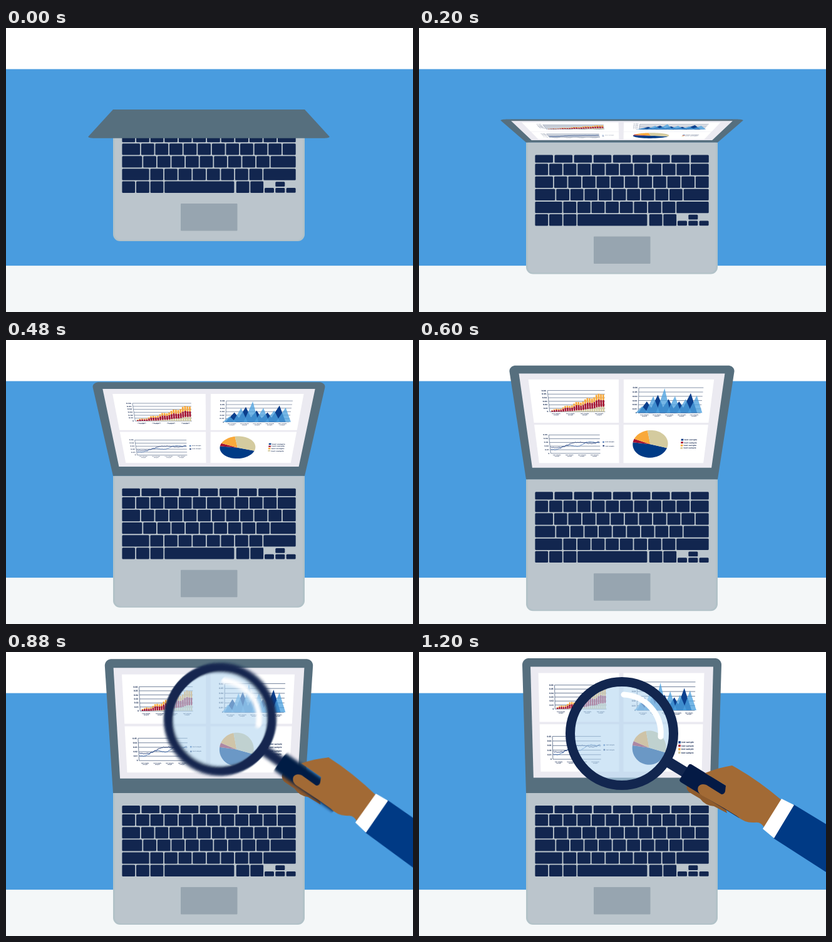
Animation of 650 by 453 pixels, one loop 3040 ms. Source, as an HTML page with a canvas:

```html
<!DOCTYPE html>
<html lang="en">
<head>
<meta charset="utf-8">
<title>Laptop and magnifier</title>
<style>
html, body { margin: 0; width: 100%; height: 100%; overflow: hidden; background: #fff; }
body { position: relative; }
svg, canvas { position: absolute; left: 0; top: 0; }
</style>
</head>
<body>
<svg width="650" height="453">
  <rect y="65.600" width="650" height="313.800" fill="#499cdf"/>
  <rect y="379.400" width="650" height="80" fill="#f4f7f8"/>
  <g id="base">
    <path d="M171 225H477V424a11 11 0 0 1-11 11H182a11 11 0 0 1-11-11Z" fill="#b2c2c8"/>
    <path d="M174 225H474V424a9 9 0 0 1-9 9H183a9 9 0 0 1-9-9Z" fill="#bbc5cc"/>
    <rect x="279" y="375" width="90.500" height="43.500" rx="1" fill="#97a5b0"/>
    <g id="keys" fill="#12264f"></g>
  </g>
</svg>
<canvas id="lid" width="650" height="453"></canvas>
<svg width="650" height="453">
  <defs>
    <filter id="smear" x="-30%" y="-30%" width="160%" height="160%">
      <feGaussianBlur id="blur" stdDeviation="0"/>
    </filter>
  </defs>
  <g class="hand">
    <path d="M432 205Q423 216 432 224L449 234Q457 245 471 246L492 257L482 220Z" fill="#8f5b2c"/>
  </g>
  <g id="tool">
    <g id="smeared" transform="rotate(-53.500 324 130)">
      <g transform="rotate(53.500 324 130)">
        <circle cx="324" cy="130" r="78" fill="rgb(178,213,240)" fill-opacity=".6"/>
        <g transform="translate(324 130) rotate(31.500)">
          <rect x="85" y="-8.500" width="40" height="17" fill="#12264f"/>
          <rect x="117" y="-16" width="116" height="33" rx="4" fill="#041a45"/>
        </g>
        <circle cx="324" cy="130" r="82.500" fill="none" stroke="#12264f" stroke-width="15"/>
        <path d="M327 68A62 62 0 0 1 386 135" fill="none" stroke="#fff" stroke-width="9" stroke-linecap="round"/>
      </g>
    </g>
  </g>
  <g class="hand">
    <path d="M457 193Q480 184 500 181Q540 203 580 237L552 281Q546 270 536 272Q520 273 508 262L487 249L452 229Q443 223 446 215Q450 209 459 212L483 227Q488 227 489 222L490 213Z" fill="#a26a35"/>
    <path d="M598 243L720 317V396L566 297Z" fill="#003a85"/>
    <path d="M579 234L599 244L567 297L549 282Z" fill="#fff"/>
  </g>
</svg>
<script>
const $ = id => document.getElementById(id);
const ctx = $('lid').getContext('2d');
const NAVY = '#12264f', RED = '#a5122f', CREAM = '#d4cb9f', ORANGE = '#f9a93a', BLUE = '#003b86';
const range = (n, f) => Array.from({ length: n }, (_, i) => f(i));

// Keyboard: each row is a first key, n regular keys and a last one that fills up
const LEFT = 185.4, RIGHT = 462.7, KEY = 20.8, GAP = 1.8, PITCH = KEY + GAP;
function buildKeys() {
  let out = '';
  const key = (x, y, w = KEY, h = 18.3) =>
    out += `<rect x="${x}" y="${y}" width="${w}" height="${h}" rx="1.500"/>`;
  const keyRow = (y, first, n) => {
    const x = LEFT + first + GAP, end = x + n * PITCH;
    key(LEFT, y, first);
    range(n, i => key(x + i * PITCH, y));
    key(end, y, RIGHT - end);
  };
  const rowY = r => 259 + r * 20.15;
  range(9, i => key(LEFT + i * 31.1, 245, 28.6, 12.2));
  [[KEY, 10], [28.6, 10], [32, 9], [43.2, 8]].forEach(([w, n], r) => keyRow(rowY(r), w, n));
  range(3, i => key(LEFT + i * PITCH, rowY(4)));
  key(LEFT + 3 * PITCH, rowY(4), 5 * PITCH - GAP);
  range(2, i => key(367.7 + i * PITCH, rowY(4)));
  range(3, i => key(413 + i * 17.3, 350, 15, 7.8));
  key(430.3, 340.2, 15, 7.8);
  return out;
}
$('keys').innerHTML = buildKeys();

// The lid is a flat 306 x 208 sheet, hinged at its bottom edge
let hinge, sin, rise;
function project(x, y) {
  const v = 1 - y / 208, w = 1 - .22 * v * sin;
  return [324 + (x - 153) / w, hinge - 208 * rise * v / w];
}
function trace(pts) {
  ctx.beginPath();
  for (const [x, y] of pts) ctx.lineTo(...project(x, y));
}
function poly(pts, color) {
  trace(pts);
  ctx.fillStyle = color;
  ctx.fill();
}
const box = (x, y, w, h, color) => poly([[x, y], [x + w, y], [x + w, y + h], [x, y + h]], color);
function line(pts, color, w) {
  trace(pts);
  ctx.strokeStyle = color;
  ctx.lineWidth = w * (.4 + .6 * rise);
  ctx.stroke();
}
function label(x, y, size, str, align = 'left') {
  const [px, py] = project(x, y), [rx] = project(x + 1, y), [dx, dy] = project(x, y + 1);
  ctx.save();
  ctx.setTransform(rx - px, 0, dx - px, dy - py, px, py);
  ctx.font = `700 ${size}px "Open Sans", Arial, sans-serif`;
  ctx.textAlign = align;
  ctx.fillStyle = NAVY;
  ctx.fillText(str, 0, 0);
  ctx.restore();
}
const arc = (cx, cy, r, from, to) => range(25, i => {
  const a = (from + (to - from) * i / 24) * Math.PI / 180;
  return [cx + r * Math.sin(a), cy - r * Math.cos(a)];
});

function grid(x0, x1, y0, y1, rows, names) {
  range(rows, i => {
    const y = y0 + (y1 - y0) * i / (rows - 1), v = rows - 1 - i;
    line([[x0, y], [x1, y]], '#4c6080', .8);
    label(x0 - 2, y + 1.1, 3.2, v ? '0.0' + v : '0', 'right');
  });
  line([[x0, y0], [x0, y1]], '#4c6080', .8);
  range(names, i => {
    const x = x0 + 9 + i * (x1 - x0 - 18) / (names - 1);
    label(x, y1 + 4.4, 2.1, 'text sample', 'center');
    label(x, y1 + 6.5, 2.1, 'sample', 'center');
  });
}

function bars() {
  range(24, i => {
    const u = i / 23, h = 3 + 29 * u ** 1.2 + 2.2 * u ** .3 * Math.sin(u * 30 - 6.5);
    const part = (from, to, color) =>
      box(51.5 + i * 3.22, 76.3 - h * to, 2.4, h * (to - from), color);
    part(0, .3 * u, CREAM);
    part(.3 * u, .68, RED);
    part(.68, 1, ORANGE);
  });
}

const trend = (start, climb, wave, freq, color) => line(range(40, i => {
  const u = i / 39;
  return [45 + 74 * u, start - climb * u + wave * Math.sin(freq * u) + .7 * Math.sin(i * i)];
}), color, .9);

const peaks = (x0, half, heights, color) => heights.forEach((h, i) => {
  const x = x0 + i * 15.3;
  poly([[x - half, 78.4], [x, 78.4 - h], [x + half, 78.4]], color);
});

const pie = [[106, 278, BLUE], [278, 293, RED], [293, 349, ORANGE], [349, 466, CREAM]];

function drawLid() {
  ctx.clearRect(0, 0, 650, 453);
  poly([[0, 208], ...arc(10, 10, 10, -90, 0), ...arc(296, 10, 10, 0, 90), [306, 208]], '#566f7e');
  if (rise < 0) return;
  box(12.5, 12.5, 281, 171, '#ebeaf1');
  for (const x of [24.3, 155.5]) for (const y of [22, 99.8]) box(x, y, 124.3, 74, '#fff');

  grid(49, 129, 40, 76.3, 7, 4);
  bars();

  grid(44, 120, 118.5, 154.2, 6, 4);
  trend(146, 15, 2.5, 14, '#3d6cb0');
  trend(142, 12, 3, 9, '#1b3470');
  ['#3d6cb0', '#1b3470'].forEach((c, i) => {
    box(124, 130.8 + i * 7.4, 2.4, 2.4, c);
    label(127.8, 132.9 + i * 7.4, 2.3, 'text sample');
  });

  grid(176.6, 266.6, 35.4, 78.4, 7, 5);
  peaks(188.4, 12, [20, 31, 24, 20, 34], '#0b3f8d');
  peaks(182, 9, [12], 'rgba(77,161,223,.78)');
  peaks(197.3, 10.5, [29, 42, 29, 24, 30], 'rgba(77,161,223,.78)');

  pie.forEach(([from, to, c], i) => {
    poly([[196, 136.3], ...arc(196, 136.3, 26.6, from, to)], c);
    box(242, 125.9 + i * 5.4, 3.4, 3.4, c);
    label(246.6, 128.8 + i * 5.4, 3.3, 'text sample');
  });
}

function draw(t) {
  // The base slides down while the lid swings up
  const x = t / 1200;
  const p = x + x * x * (1 - x) + .006 * Math.sin(2 * Math.PI * x);
  const tilt = (102 - 91.6 * p) * Math.PI / 180;
  hinge = 225 - 95 * Math.max(0, 1 - t / 900) ** 3.2;
  sin = Math.sin(tilt);
  rise = (208.5 * Math.cos(tilt) + 7.6 * sin) / 208;
  $('base').setAttribute('transform', `translate(0 ${hinge - 225})`);
  drawLid();

  // The arm swings around a point beyond the corner; the tool smears with its speed
  const left = Math.max(0, Math.min(1, (1140 - t) / 540));
  const swing = 65.7 * left ** 4, smear = 10.4 * (left / .778) ** 3;
  const turn = `rotate(${swing} 701 409)`;
  $('tool').setAttribute('transform', turn);
  for (const g of document.querySelectorAll('.hand'))
    g.setAttribute('transform', `translate(${.21 * swing} ${-.25 * swing}) ${turn}`);
  $('blur').setAttribute('stdDeviation', `${smear} ${smear * .3}`);
  if (smear > .05) $('smeared').setAttribute('filter', 'url(#smear)');
  else $('smeared').removeAttribute('filter');
  for (const g of [$('tool'), ...document.querySelectorAll('.hand')])
    g.style.display = t < 600 ? 'none' : '';
}

function tick() {
  const t = performance.now() % 3040;
  draw(Math.min(1200, Math.floor(t / 40) * 40));
  requestAnimationFrame(tick);
}
tick();
</script>
</body>
</html>
```
